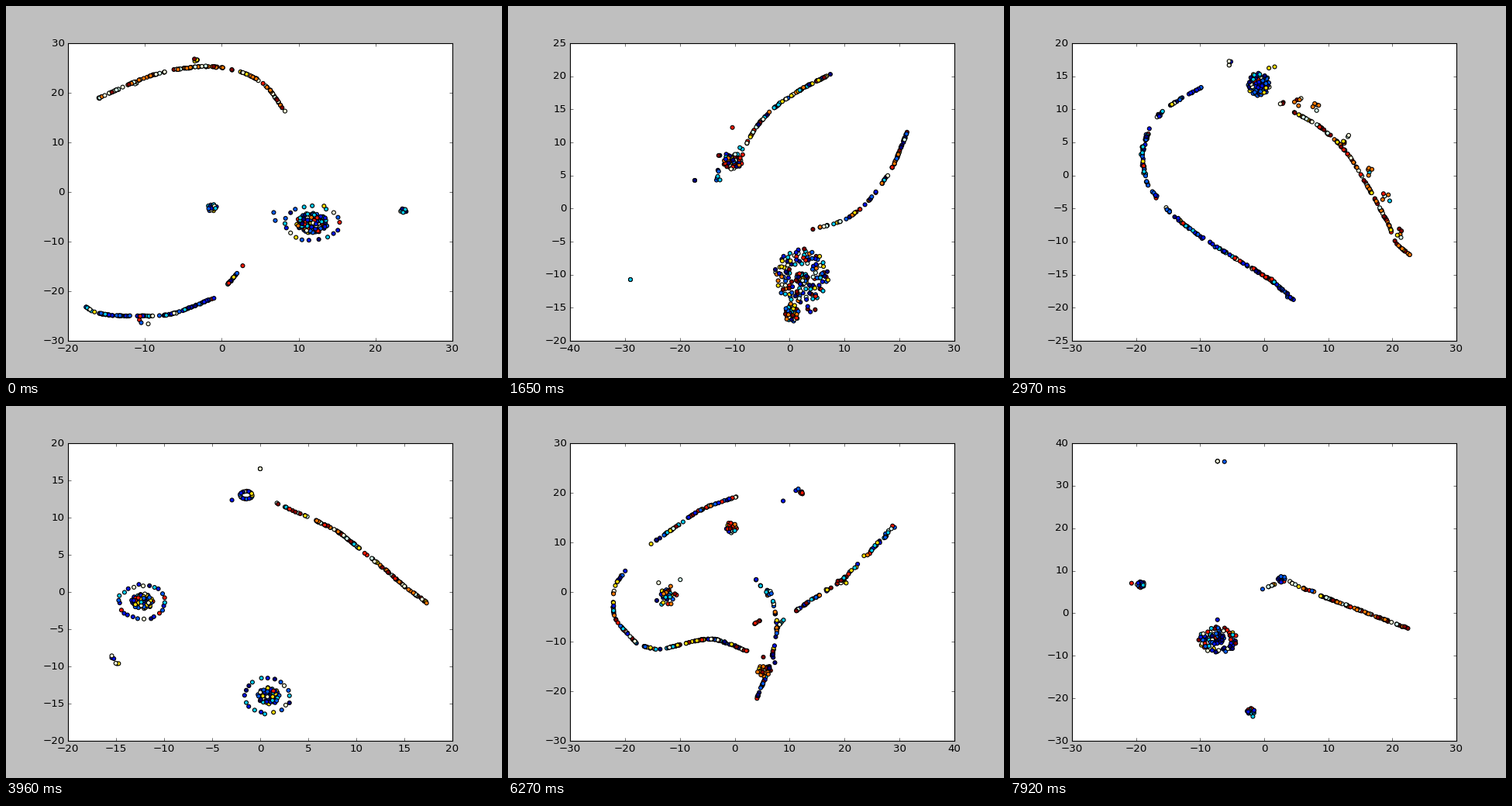
Recreate the animation shown at these times as a matplotlib script. Size 640 by 480 pixels, loop 8 s.

```python
import numpy as np
import matplotlib.pyplot as plt
from matplotlib.animation import FuncAnimation

LOOP, TICK, HOLD = 8000, 40, 330
LEFT, BOTTOM, WIDE, HIGH = 80, 432, 496, 384

PALETTE = dict(n="#000084", b="#0010f0", a="#005cff", c="#00ccf5", m="#d4fff0",
               i="#fbffdc", y="#ffe000", o="#ff7800", r="#ff1800", d="#840000")
COOL = "nnbbbaaaccryi"
WARM = "ddddooooommiiyr"
ALL = "nnbbaaccmiyyoorrdd"

plt.rcParams.update({
    "font.family": "DejaVu Sans", "font.size": 12, "axes.linewidth": 1,
    "figure.facecolor": "0.75", "savefig.facecolor": "0.75",
    "xtick.top": True, "ytick.right": True, "ytick.alignment": "center",
})


def spline(pts, u):
    """Catmull-Rom curve through pts, u in 0..1 along its length."""
    p = np.array(pts, float)
    p = np.vstack([2 * p[0] - p[1], p, 2 * p[-1] - p[-2]])
    s = np.linspace(0, len(pts) - 1, 300)
    k = np.minimum(s.astype(int), len(pts) - 2)
    t = (s - k)[:, None]
    a, b, c, d = p[k], p[k + 1], p[k + 2], p[k + 3]
    q = 0.5 * (2 * b + (c - a) * t + (2 * a - 5 * b + 4 * c - d) * t**2
               + (3 * b - a - 3 * c + d) * t**3)
    length = np.r_[0, np.cumsum(np.hypot(*np.diff(q, axis=0).T))]
    at = u * length[-1]
    return np.c_[np.interp(at, length, q[:, 0]), np.interp(at, length, q[:, 1])]


class Cloud:
    """Collects coloured dots in stage pixels."""

    def __init__(self, seed, drift):
        self.rng = np.random.default_rng(seed)
        self.drift = drift
        self.xy, self.colors = [], []

    def add(self, xy, letters):
        self.xy.append(xy + self.rng.normal(0, 1, 2) * self.drift)
        self.colors += [PALETTE[c] for c in self.rng.choice(list(letters), len(xy))]

    def line(self, n, letters, *pts, lean=1, spread=0.3):
        """Dots strewn along a curve; lean > 1 crowds them to its start."""
        u = self.rng.random(n) ** lean
        u[:2] = 0, 1
        self.add(spline(pts, u) + self.rng.normal(0, spread, (n, 2)), letters)

    def disc(self, n, letters, x, y, rx, ry, hole=0.0):
        """Evenly packed ellipse, or a band around a hole."""
        k = np.arange(n)
        r = np.sqrt(hole**2 + (1 - hole**2) * (k + 0.5) / n)
        a = k * 2.39996 + self.rng.normal(0, 0.1, n)
        self.add(np.c_[x + rx * r * np.cos(a), y + ry * r * np.sin(a)], letters)

    def ring(self, n, letters, x, y, rx, ry):
        a = 2 * np.pi * np.arange(n) / n + self.rng.normal(0, 0.05, n)
        r = self.rng.normal(1, 0.03, n)
        self.add(np.c_[x + rx * r * np.cos(a), y + ry * r * np.sin(a)], letters)

    def spray(self, n, letters, x, y, rx=1, ry=1):
        """A few loose dots."""
        self.add(self.rng.uniform(-1, 1, (n, 2)) * (rx, ry) + (x, y), letters)

    def finish(self, box):
        xy = np.vstack(self.xy)
        if box:
            lo, hi = xy.min(0), xy.max(0)
            a, b = np.array(box[:2]) + 3, np.array(box[2:]) - 3
            xy = a + (xy - lo) / (hi - lo) * (b - a)
        order = self.rng.permutation(len(xy))
        xy = (xy - (LEFT, BOTTOM)) / (WIDE, -HIGH)
        return xy[order], np.array(self.colors)[order]


def arches(c):
    c.line(50, "ooommiid", (120, 119), (150, 105), (181, 92), (205, 85))
    c.line(95, WARM, (217, 82), (262, 78), (305, 86), (335, 103), (360, 136))
    c.spray(5, "oyid", 244, 71, 8, 3)
    c.spray(2, "m", 170, 101, 4, 3)
    c.line(95, COOL, (103, 388), (115, 395), (137, 399), (175, 400), (215, 397), (268, 377))
    c.spray(3, "iar", 178, 407, 6, 4)
    c.line(18, COOL, (286, 359), (298, 345))
    c.spray(1, "r", 305, 335)
    c.disc(15, COOL, 266, 260, 6, 5)
    c.disc(120, COOL + "rro", 395, 280, 20, 13)
    c.ring(20, COOL, 395, 280, 35, 23)
    c.spray(2, "ra", 346, 272, 2, 7)
    c.disc(10, COOL, 513, 264, 4, 3)


def comets(c):
    c.line(90, ALL, (308, 177), (323, 153), (344, 131), (376, 109), (416, 88))
    c.line(75, ALL, (515, 163), (497, 206), (480, 232), (463, 254), (434, 276),
           (394, 288), lean=1.4)
    c.disc(45, ALL, 290, 201, 12, 10)
    c.spray(10, ALL, 290, 190, 20, 8)
    c.spray(6, "oacn", 272, 217, 5, 9)
    c.spray(2, "n", 241, 225, 0, 0)
    c.spray(1, "r", 289, 156)
    c.spray(2, "c", 158, 353, 0, 0)
    c.disc(115, ALL, 379, 348, 35, 35, hole=0.42)
    c.disc(35, ALL, 379, 352, 8, 8)
    c.disc(38, ALL, 366, 396, 9, 12)
    c.spray(4, "bdd", 389, 396, 9, 9)


def horseshoe(c):
    c.line(22, COOL, (247, 105), (225, 117), (207, 128))
    c.line(65, COOL, (197, 136), (183, 153), (171, 190), (177, 228), (189, 246), spread=0.8)
    c.line(115, COOL, (201, 261), (238, 292), (300, 331), (337, 354), (365, 379), spread=0.6)
    c.disc(78, COOL, 321, 101, 14, 15)
    c.spray(4, "iib", 284, 72, 2, 5)
    c.spray(2, "ry", 337, 83, 6, 6)
    c.spray(3, "doi", 350, 125, 3, 2)
    c.line(115, WARM, (367, 137), (400, 156), (430, 184), (450, 213),
           (485, 275), (497, 304), (516, 321))
    # side sprouts along the right arm
    for x, y in (371, 125), (394, 130), (435, 172), (465, 215), (485, 246), (501, 293):
        c.spray(5, WARM + "c", x, y, 5, 6)


def islands(c):
    c.line(14, WARM + "cca", (349, 125), (368, 134), (389, 143))
    c.line(55, WARM + "c", (400, 148), (428, 162), (456, 184))
    c.line(55, WARM, (463, 190), (487, 209), (515, 233), (543, 254))
    c.ring(17, COOL + "oi", 310, 115, 8, 5)
    c.spray(1, "b", 291, 122)
    c.spray(3, "i", 328, 81, 0, 0)
    c.line(6, "inby", (135, 322), (144, 334), spread=1)
    c.disc(60, COOL + "yi", 176, 252, 14, 10)
    c.ring(25, COOL, 176, 253, 30, 22)
    c.disc(60, COOL, 339, 374, 14, 11)
    c.ring(20, COOL, 337, 374, 29, 23)


def face(c):
    c.line(38, ALL, (294, 97), (268, 107), (239, 127), (209, 155), (187, 175), lean=1.3)
    c.disc(38, COOL, 194, 243, 9, 9)
    c.disc(62, ALL, 192, 243, 28, 32, hole=0.6)
    c.line(22, ALL, (142, 244), (137, 270), (139, 305), (149, 332), (158, 343))
    c.line(18, ALL, (172, 352), (190, 360), (214, 355))
    c.line(26, ALL, (227, 351), (248, 343), (270, 343))
    c.line(9, COOL, (286, 347), (307, 361), (317, 370))
    c.disc(20, ALL, 224, 400, 5, 6)
    c.disc(24, ALL, 326, 396, 7, 8)
    c.disc(7, "nnb", 340, 366, 3, 3)
    c.spray(1, "c", 213, 408)
    c.spray(1, "c", 345, 387)
    c.line(55, ALL, (356, 137), (377, 164), (396, 199))
    c.line(48, ALL, (401, 215), (402, 240), (400, 275), (394, 304))
    c.line(11, "mibnc", (344, 323), (358, 307), (383, 282))
    c.spray(1, "i", 319, 316)
    c.disc(7, "nca", 374, 318, 2, 2)
    c.line(6, "ood", (382, 344), (412, 333))
    c.line(40, ALL, (414, 258), (444, 226), (467, 198), (483, 171), (498, 149))


def swirl(c):
    c.line(60, ALL, (185, 178), (215, 157), (249, 134), (294, 117))
    c.disc(22, ALL, 288, 157, 7, 7)
    c.disc(5, "rn", 379, 112, 2, 2)
    c.line(3, "ab", (355, 123), (374, 107))
    c.line(50, ALL, (151, 213), (138, 233), (136, 255), (140, 277), (166, 306))
    c.line(28, ALL, (175, 310), (195, 314), (222, 308))
    c.line(62, ALL, (230, 306), (265, 301), (308, 316))
    c.disc(22, ALL, 204, 243, 7, 7)
    c.spray(11, ALL, 203, 242, 20, 18)
    c.line(5, "abc", (320, 224), (326, 232))
    c.disc(9, ALL, 336, 241, 4, 4)
    c.line(30, ALL, (342, 252), (347, 285), (341, 322))
    c.line(6, "bcmi", (355, 276), (348, 286))
    c.line(5, "dri", (318, 281), (325, 277))
    c.spray(3, "dni", 334, 326, 13, 8)
    c.disc(22, WARM, 330, 342, 9, 7)
    c.line(26, "nbacdr", (338, 336), (321, 377))
    c.line(25, ALL, (372, 264), (390, 251), (402, 244))
    c.line(50, ALL, (411, 239), (436, 220), (463, 193), (499, 154), spread=1)
    c.spray(3, "yi", 433, 233, 5, 6)


def tail(c):
    c.spray(3, "i", 267, 71, 0, 0)
    c.spray(1, "a", 274, 71)
    c.spray(1, "r", 156, 231)
    c.disc(20, COOL, 168, 230, 5, 4)
    c.disc(42, COOL, 267, 301, 11, 7)
    c.disc(52, COOL + "rd", 267, 301, 25, 17, hole=0.65)
    c.spray(1, "b", 265, 277)
    c.disc(18, COOL, 311, 393, 5, 4)
    c.spray(1, "c", 312, 401)
    c.line(7, "mmyoa", (326, 235), (341, 229))
    c.disc(20, COOL + "ra", 350, 224, 5, 4)
    c.line(14, WARM + "a", (361, 226), (376, 234), (392, 239))
    c.line(85, WARM, (402, 243), (434, 255), (514, 285))


# steps held, shape, x limits, y limits, box the dots are fitted to
RUNS = [
    (1, arches, (-20, 30), (-30, 30), None),
    (2, arches, (-40, 30), (-30, 30), (155, 67, 536, 414)),
    (1, comets, (-40, 30), (-20, 25), None),
    (1, comets, (-40, 30), (-30, 30), None),
    (1, comets, (-40, 30), (-20, 25), None),
    (1, comets, (-30, 20), (-20, 25), None),
    (2, horseshoe, (-30, 30), (-30, 30), (168, 106, 520, 364)),
    (3, horseshoe, (-30, 30), (-25, 20), None),
    (1, islands, (-20, 20), (-20, 20), None),
    (3, islands, (-20, 20), (-20, 20), (102, 79, 545, 407)),
    (3, face, (-30, 40), (-20, 25), None),
    (2, swirl, (-30, 40), (-30, 30), None),
    (1, swirl, (-20, 50), (-30, 30), None),
    (3, tail, (-30, 30), (-30, 40), None),
]


def build():
    steps = []
    for count, shape, xlim, ylim, box in RUNS:
        for k in range(count):
            cloud = Cloud(len(steps) + 7, min(k, 1))
            shape(cloud)
            steps.append((xlim, ylim, *cloud.finish(box)))
    return steps


def ticks(lim):
    gap = 5 if lim[1] - lim[0] <= 45 else 10
    return np.arange(lim[0], lim[1] + 1, gap)


steps = build()

fig = plt.figure(figsize=(8, 6), dpi=80)
ax = fig.add_axes([0.125, 0.1, 0.775, 0.8])
ax.tick_params(direction="in", length=4, width=0.5, pad=4)
dots = ax.scatter([], [], s=20, edgecolors="black", linewidths=1, transform=ax.transAxes)
shown = [None]


def update(i):
    step = min((i * TICK + TICK - 1) // HOLD, len(steps) - 1)
    if step != shown[0]:
        shown[0] = step
        xlim, ylim, xy, colors = steps[step]
        ax.set(xticks=ticks(xlim), yticks=ticks(ylim), xlim=xlim, ylim=ylim)
        dots.set_offsets(xy)
        dots.set_facecolors(colors)
    return [dots]


def reset():
    shown[0] = None
    return update(0)


anim = FuncAnimation(fig, update, frames=LOOP // TICK, init_func=reset,
                     interval=TICK, repeat=True, repeat_delay=0, blit=False)
plt.show()
```
